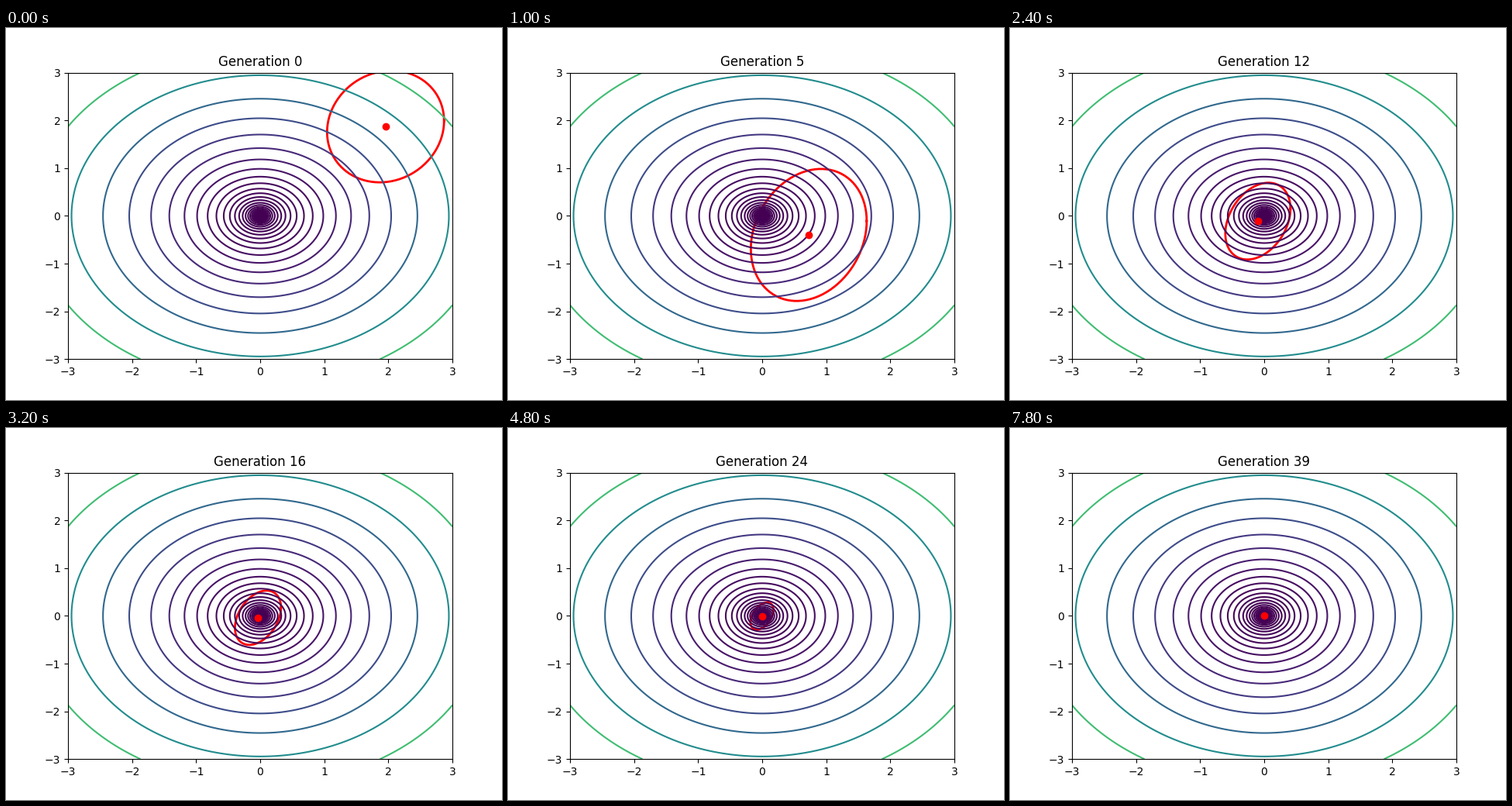
Animation, 640 px wide and 480 px high, one loop 8 s. Source, as a matplotlib script:

```python
import numpy as np
import matplotlib.pyplot as plt
from matplotlib.animation import FuncAnimation

FRAMES, INTERVAL = 40, 200

# Key points of the search: generation, mean x, mean y, half width, half height
KEYS = np.array([
    (0, 1.957, 1.872, 0.913, 1.170),
    (5, 0.727, -0.400, 0.904, 1.383),
    (9, -0.216, -0.242, 0.659, 1.043),
])
MEAN_DECAY, SIZE_DECAY = 0.77, 0.917  # per generation, after the last key

THETA = np.linspace(0, 2 * np.pi, 181)


def search_state(gen):
    """Mean and half extents: linear between keys, then geometric convergence."""
    x, y, w, h = (np.interp(gen, KEYS[:, 0], col) for col in KEYS[:, 1:].T)
    extra = max(0, gen - KEYS[-1, 0])
    move, size = MEAN_DECAY**extra, SIZE_DECAY**extra
    return x * move, y * move, w * size, h * size


def ellipse(gen):
    x, y, w, h = search_state(gen)
    rho = 0.1 + 0.5 * (1 - np.exp(-gen / 20))
    u, v = np.cos(THETA), np.sin(THETA)
    return x + w * u, y + h * (rho * u + np.sqrt(1 - rho**2) * v)


fig, ax = plt.subplots(figsize=(6.4, 4.8), dpi=100)

# Sphere function with log-spaced level lines
axis = np.linspace(-3, 3, 200)
X, Y = np.meshgrid(axis, axis)
Z = X**2 + Y**2
levels = np.logspace(np.log10(Z.min()), np.log10(Z.max()), 30)
ax.contour(X, Y, Z, levels=levels, cmap="viridis", linewidths=1.5)

spread, = ax.plot([], [], color="red", lw=2, zorder=1)
mean, = ax.plot([], [], "ro", zorder=3)
title = ax.set_title("Generation 0")
ax.set_xlim(-3, 3)
ax.set_ylim(-3, 3)


def update(gen):
    x, y, *_ = search_state(gen)
    spread.set_data(*ellipse(gen))
    mean.set_data([x], [y])
    title.set_text(f"Generation {gen}")
    return spread, mean, title


anim = FuncAnimation(fig, update, frames=FRAMES, interval=INTERVAL,
                     repeat=True, repeat_delay=0)
plt.show()
```
